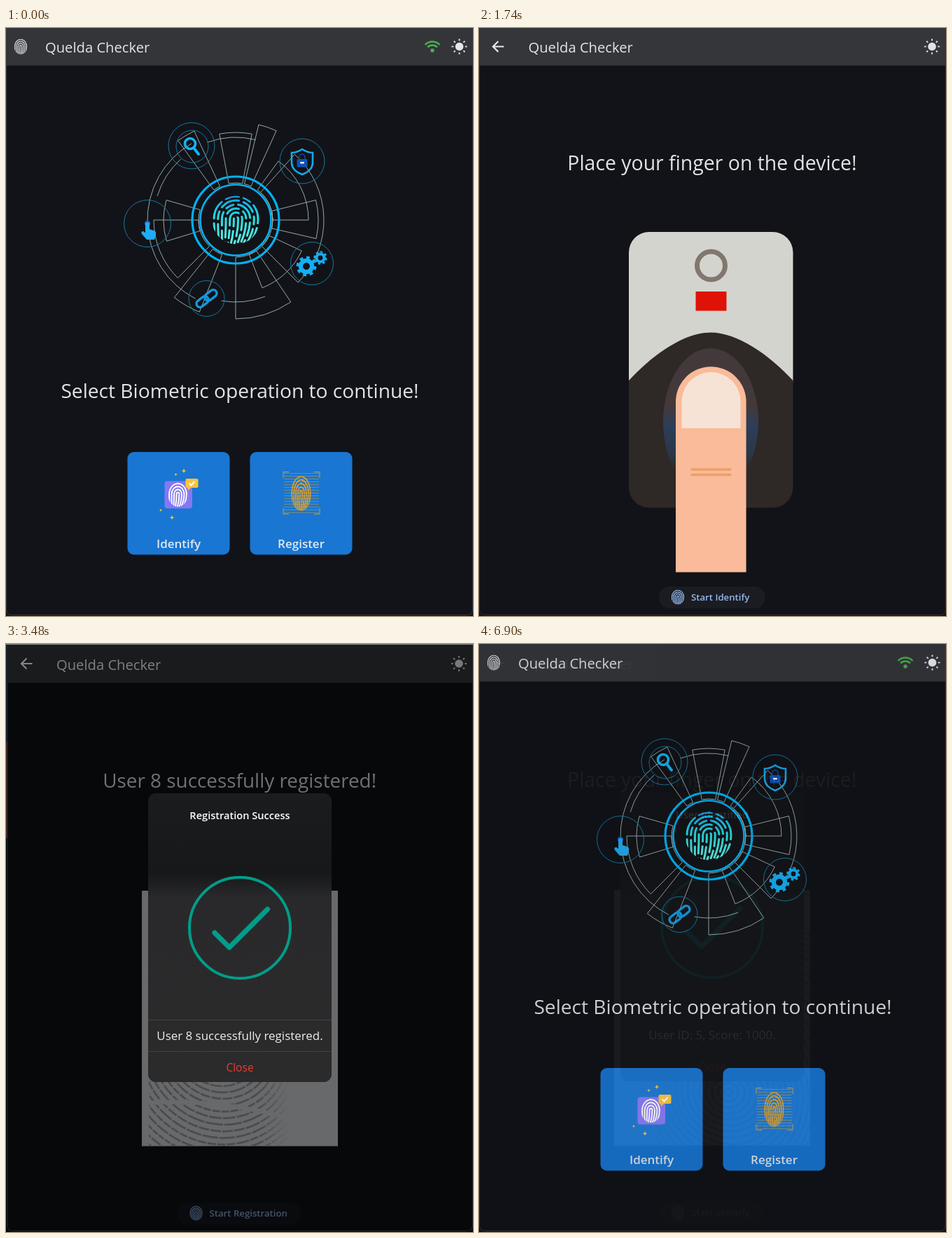
Animation of 667 by 839 pixels, one loop 6.96 s. Source, as an HTML page:

```html
<!DOCTYPE html>
<html lang="en">
<head>
<meta charset="utf-8">
<title>Fingerprint scanner</title>
<style>
html, body { margin: 0; width: 100%; height: 100%; overflow: hidden; background: #121318; }
svg { position: absolute; left: 0; top: 0; width: 100%; height: 100%; animation: 6960ms step-end infinite; }
text { font-family: "Open Sans", "Noto Sans", sans-serif; white-space: pre; }
#place { animation-name: place; }
#registered { animation-name: registered; }
#identified { animation-name: identified; }
@keyframes place {
  0% { opacity: 0; }
  17.241% { opacity: 0; animation-timing-function: steps(10, start); }
  25.862% { opacity: 1; }
  51%, 100% { opacity: 0; }
}
@keyframes registered {
  0% { opacity: 0; }
  42.241% { opacity: 0; animation-timing-function: steps(10, start); }
  50.862% { opacity: 1; }
  76%, 100% { opacity: 0; }
}
@keyframes identified {
  0% { opacity: 0; }
  67.241% { opacity: 0; animation-timing-function: steps(10, start); }
  75.862% { opacity: 1; }
  92.241% { opacity: 1; animation-timing-function: steps(9, start); }
  100% { opacity: .1; }
}
</style>
</head>
<body>
<svg id="home" viewBox="0 0 667 839"></svg>
<svg id="place" viewBox="0 0 667 839"></svg>
<svg id="registered" viewBox="0 0 667 839"></svg>
<svg id="identified" viewBox="0 0 667 839"></svg>
<script>
const APP = 'Quelda Checker';
const CX = 328, CY = 274, INNER = 53;
let ids = 0;

const range = n => Array.from({ length: n }, (_, i) => i);
const rect = (x, y, w, h, fill, r = 0, more = '') =>
  `<rect x="${x}" y="${y}" width="${w}" height="${h}" rx="${r}" fill="${fill}" ${more}/>`;
const circle = (x, y, r, fill, more = '') =>
  `<circle cx="${x}" cy="${y}" r="${r}" fill="${fill}" ${more}/>`;
const ring = (x, y, r, color, w, more = '') =>
  circle(x, y, r, 'none', `stroke="${color}" stroke-width="${w}" ${more}`);
const line = (d, color, w, more = '') =>
  `<path d="${d}" fill="none" stroke="${color}" stroke-width="${w}" ${more}/>`;
const shape = (d, fill) => `<path d="${d}" fill="${fill}"/>`;
const text = (s, x, y, size, fill, anchor = 'start', weight = 400) =>
  `<text x="${x}" y="${y}" font-size="${size}" fill="${fill}" text-anchor="${anchor}" font-weight="${weight}">${s}</text>`;
const ROUND = 'stroke-linecap="round" stroke-linejoin="round"';

// Angles run clockwise from the top, in degrees.
function polar(r, deg) {
  const a = deg * Math.PI / 180;
  return `${(CX + r * Math.sin(a)).toFixed(1)} ${(CY - r * Math.cos(a)).toFixed(1)}`;
}
const arc = (r, a, b) => `M${polar(r, a)}A${r} ${r} 0 0 1 ${polar(r, b)}`;
const sector = (r, a, b) =>
  `M${polar(INNER, a)}L${polar(r, a)}A${r} ${r} 0 0 1 ${polar(r, b)}L${polar(INNER, b)}A${INNER} ${INNER} 0 0 0 ${polar(INNER, a)}`;

// Nested arches trimmed to an ellipse.
function print(x, y, rx, ry, color, w, n, dash = '') {
  const id = 'clip' + ids++;
  const arches = range(n).map(i => {
    const k = (i + .55) / n, ax = rx * k, ay = ry * k;
    const end = ax * .75, lean = rx * .15, c = -ry * .05;
    const d = `M${-end - lean} ${ry}Q${-ax} ${ry * .5} ${-ax} ${c}A${ax} ${ay} 0 0 1 ${ax} ${c}Q${ax} ${ry * .5} ${end - lean} ${ry}`;
    return line(d, color, w, `stroke-linecap="round" stroke-dasharray="${dash}" stroke-dashoffset="${i * 17}"`);
  }).join('');
  return `<g transform="translate(${x} ${y})"><clipPath id="${id}"><ellipse rx="${rx}" ry="${ry}"/></clipPath><g clip-path="url(#${id})">${arches}</g></g>`;
}

const sun = (x, y, color) => circle(x, y, 5.8, color) +
  ring(x, y, 9.6, color, 2.8, 'pathLength="8" stroke-dasharray=".26 .74" stroke-dashoffset=".13"');
const back = (x, y, color) =>
  line(`M${x + 8} ${y}H${x - 7}M${x} ${y - 7.5}L${x - 7.5} ${y}L${x} ${y + 7.5}`, color, 2.2);
const gear = (x, y, r, color) => ring(x, y, r * .58, color, r * .44) +
  ring(x, y, r * .88, color, r * .3, 'pathLength="16" stroke-dasharray="1"');
const star = (x, y, r) =>
  shape(`M${x} ${y - r}Q${x} ${y} ${x + r} ${y}Q${x} ${y} ${x} ${y + r}Q${x} ${y} ${x - r} ${y}Q${x} ${y} ${x} ${y - r}`, '#ffc93c');
const frame = (x, color) => line(`M${x} 0V829Q${x} 837.5 ${x + 8} 837.5H658Q666.5 837.5 666.5 829V0`, color, 1);

function emblem() {
  const wedges = [
    [125, -10.7, 10.7], [140, 13.6, 24.5], [104, 36, 90], [118, 76, 103],
    [126, 42, 135], [104, 115, 158.6], [141, 146, 180], [141, 201.5, 218.4],
    [117, 225, 270], [103, 253, 286], [140, 324, 335]
  ];
  const arcs = [[117, 159, 190], [126, 207, 330], [118, -20, 14], [117, 287, 318]];
  const bubbles = [[265, 168, 33], [423, 190, 32], [202, 279, 33.5], [437, 336, 30.5], [286.5, 386, 25.5]];
  const link = x => rect(x, -5, 19, 10, 'none', 5, 'stroke="#1399dd" stroke-width="3.4"');
  return line(wedges.map(w => sector(...w)).join('') + arcs.map(a => arc(...a)).join(''), '#a3b9b9', .9) +
    bubbles.map(b => ring(...b, '#14799f', 1)).join('') +
    ring(266, 169, 23, '#14799f', 1) +
    ring(CX, CY, 62, '#00b2f5', 3.2) + ring(CX, CY, 50.5, '#00b2f5', 2.6) +
    print(CX + .5, CY, 34, 34.5, 'url(#aqua)', 3, 6, '19 7 11 7 27 7') +
    // magnifier
    ring(263, 165, 7.5, '#12b4f2', 3.6) + line('M268 171L275 180', '#12b4f2', 4, ROUND) +
    // shield and lock
    line('M423 173Q431 178 438 178V193Q437 204 423 209Q409 204 408 193V178Q415 178 423 173Z', '#16a9ec', 2.6) +
    line('M419 188V184a4 4 0 0 1 8 0V188', '#0b3c86', 2) + rect(415.5, 187, 15, 11.5, '#0d52b8', 1.5) +
    rect(420, 191, 6, 2.6, '#e8f4ff', 1) +
    // pointing hand
    circle(202, 279, 4.2, '#0d5fc0') +
    shape('M199 280a3 3 0 0 1 6 0v7l6 2q4 1 3 6l-2 7h-11l-7-8q-2-4 2-4l3 2z', '#23aaf0') +
    gear(429, 340, 14, '#14aef5') + gear(449, 328, 9.5, '#14aef5') +
    `<g transform="translate(286.5 386) rotate(-38)">${link(-17)}${link(-2)}</g>`;
}

function home() {
  const wifi = r => line(`M${609 - r * .72} ${34 - r * .69}A${r} ${r} 0 0 1 ${609 + r * .72} ${34 - r * .69}`, '#4caf50', 2.5);
  const scan = range(15).map(i => `M397 ${635.5 + i * 4}H447`).join('');
  return `<defs><linearGradient id="aqua" gradientUnits="userSpaceOnUse" x1="0" y1="-34" x2="0" y2="34">
      <stop stop-color="#139fe8"/><stop offset=".45" stop-color="#25dce0"/><stop offset="1" stop-color="#62efe4"/>
    </linearGradient></defs>` +
    rect(0, 0, 667, 839, '#121318') + rect(0, 0, 667, 53.5, '#343539') + frame(.5, '#37383b') +
    print(21, 26.5, 9.5, 11, '#d6d6d8', 1.3, 4) +
    text(APP, 56, 35, 20.2, '#e4e4e6') +
    wifi(14.5) + wifi(9.5) + circle(609, 32, 2.7, '#4caf50') + sun(647.5, 26.5, '#e6e6e8') +
    emblem() +
    text('Select Biometric operation to continue!', 334, 528, 28.2, '#e3e3e5', 'middle') +
    rect(173.5, 605, 146, 146.5, '#1976d2', 9) + rect(348.5, 605, 146, 146.5, '#1976d2', 9) +
    text('Identify', 246.5, 741.5, 17, '#e2e9f2', 'middle', 600) +
    text('Register', 421.5, 741.5, 17, '#e2e9f2', 'middle', 600) +
    rect(226.5, 646.5, 39.5, 39, '#8577f5', 4) + print(245.5, 666, 14, 17, '#fff', 1.9, 4) +
    rect(256.5, 643, 18, 13, '#fcc43a', 2) + shape('M259 655h6l-5 5z', '#fcc43a') +
    line('M261.5 649.5l3 3l5-5.5', '#fff', 2) +
    star(254, 632, 4) + star(242.5, 637, 2.7) + star(221, 688, 2.8) + star(237, 698.5, 4) +
    line(scan, '#b39a4e', 1, 'opacity=".6"') +
    line('M396 642V633.5H404M440 633.5H448V642M396 685V693.5H404M440 693.5H448V685', '#b9a35a', 1) +
    print(421.5, 664, 14.5, 25, '#e0a02c', 1.8, 5, '14 2 7 2');
}

function start(label, x, y, pill, color) {
  const left = x - 46;
  return rect(left, y - 16, 2 * (333 - left), 31.5, pill, 15.7) +
    print(x - 19, y - 1, 9.5, 10.5, color, 1.3, 4) + text(label, x, y + 4, 13.2, color, 'start', 600);
}

function place() {
  return `<defs><linearGradient id="oval" x1="0" y1="0" x2="0" y2="1">
      <stop offset=".4" stop-color="#43393b"/><stop offset=".52" stop-color="#2d3e57"/>
      <stop offset=".72" stop-color="#2c3648"/><stop offset=".82" stop-color="#2e2827"/>
    </linearGradient></defs>` +
    rect(0, 0, 667, 839, '#121318') + rect(0, 0, 667, 53.5, '#353639') + frame(.5, '#2f3033') +
    back(27.5, 26.5, '#e8e8ea') + text(APP, 70.5, 35, 20.2, '#e4e4e6') + sun(647, 26.5, '#e2e2e4') +
    text('Place your finger on the device!', 333, 203, 28.4, '#e3e3e5', 'middle') +
    rect(214, 291, 234.5, 240, '#d4d4ce', 29) +
    shape('M214 503C248 466 293 434.5 331 434.5S414 466 448.5 503V655.5a29 29 0 0 1-29 29H243a29 29 0 0 1-29-29Z', '#2e2827') +
    '<ellipse cx="331" cy="562" rx="68" ry="105" fill="url(#oval)"/>' +
    shape('M281 776.5V533.5a50.3 50.3 0 0 1 100.6 0V776.5Z', '#f9bb99') +
    shape('M289.5 571V533a42 42 0 0 1 84 0V571Z', '#f7e3d6') +
    line('M304 630H359M304 637.5H359', '#ec9f6a', 3.4, ROUND) +
    ring(331.5, 339, 20, '#81776f', 7) + rect(309.5, 376, 44, 27.5, '#df1207') +
    start('Start Identify', 303, 813, '#1b1c21', '#93bcf0');
}

// Wavy, broken ridges around a core, on a grey sheet.
function ridges(x, y, n, color) {
  return range(n).map(i => {
    const r = 5 + i * 8.3;
    return `<ellipse cx="${x}" cy="${y}" rx="${r * 1.08}" ry="${r}" fill="none" stroke="${color}" stroke-width="2.8"
      stroke-dasharray="${9 + i * 7 % 17} 2" transform="rotate(${i * 5} ${x} ${y})"/>`;
  }).join('');
}

function loopPhoto() {
  return `<defs><clipPath id="patch">${rect(204, 570, 200, 146.5, '#000')}</clipPath>
    <linearGradient id="fadeRight"><stop stop-color="#68696b" stop-opacity="0"/><stop offset="1" stop-color="#68696b"/></linearGradient></defs>` +
    rect(194, 352, 280, 364.5, '#68696b') +
    `<g clip-path="url(#patch)">${ridges(305, 575, 22, '#4b4c4e')}</g>` +
    line('M203 655Q300 648 402 676', '#68696b', 6) + rect(360, 570, 45, 146, 'url(#fadeRight)');
}

function whorlPhoto() {
  return `<defs><clipPath id="sheet">${rect(194, 410, 280, 306.5, '#000')}</clipPath>
    <linearGradient id="fadeLeft"><stop offset=".3" stop-color="#646567"/><stop offset="1" stop-color="#646567" stop-opacity="0"/></linearGradient></defs>` +
    rect(194, 352, 280, 364.5, '#646567') +
    `<g clip-path="url(#sheet)">${ridges(357, 641, 29, '#414244')}</g>` +
    rect(194, 410, 110, 306.5, 'url(#fadeLeft)');
}

function result(o) {
  const shade = 'shade' + ids++;
  return `<defs><linearGradient id="${shade}" x1="0" y1="0" x2="0" y2="1">
      <stop stop-color="#1b1c1d"/><stop offset=".28" stop-color="#171819"/>
      <stop offset=".36" stop-color="#29292b"/><stop offset="1" stop-color="#2b2b2c"/>
    </linearGradient></defs>` +
    rect(0, 0, 667, 839, o.bg) + `<g transform="translate(${o.shift} ${o.shift})">` +
    rect(2, 0, 666, 55.5, '#1a1b1d') + frame(2, '#27282a') +
    back(29.5, 28, '#858587') + text(APP, 72, 37, 20.2, '#808082') + sun(647, 28, '#79797b') +
    text(o.heading, 333.7, 205, o.size, '#707173', 'middle') + o.photo +
    rect(203, 213, 262, 412, `url(#${shade})`, 11) +
    text(o.title, 334, 250, 14.6, '#fff', 'middle', 600) +
    ring(334, 405, 72, '#009d8a', 4) + line('M298 412L319 433L373.5 378.5', '#009d8a', 7.2, ROUND) +
    line('M203 536.5H465M203 581.5H465', '#414244', 1) +
    text(o.message, 334, 565, 16.95, '#ededee', 'middle') +
    text('Close', 334, 610, 15.5, '#ea3d33', 'middle') +
    start(o.button, o.buttonX, 813, '#0a0b0e', '#42546d') + '</g>' + o.edge;
}

const draw = (id, content) => { document.getElementById(id).innerHTML = content; };
draw('home', home());
draw('place', place());
draw('registered', result({
  bg: '#07080a', shift: 0,
  edge: rect(0, 140, 1.5, 137, '#4b302b') + rect(0, 0, 1.5, 140, '#16202c') + rect(0, 0, 667, 1, '#8a8c8e'),
  heading: 'User 8 successfully registered!', size: 27.9, title: 'Registration Success',
  message: 'User 8 successfully registered.', button: 'Start Registration', buttonX: 290.5,
  photo: loopPhoto()
}));
draw('identified', result({
  bg: '#07060b', shift: -1, edge: rect(0, 165, 1, 94, '#1c3a66'),
  heading: 'Place your finger on the device!', size: 28.4, title: 'User Identified',
  message: 'User ID: 5, Score: 1000.', button: 'Start Identify', buttonX: 304,
  photo: whorlPhoto()
}));
</script>
</body>
</html>
```
